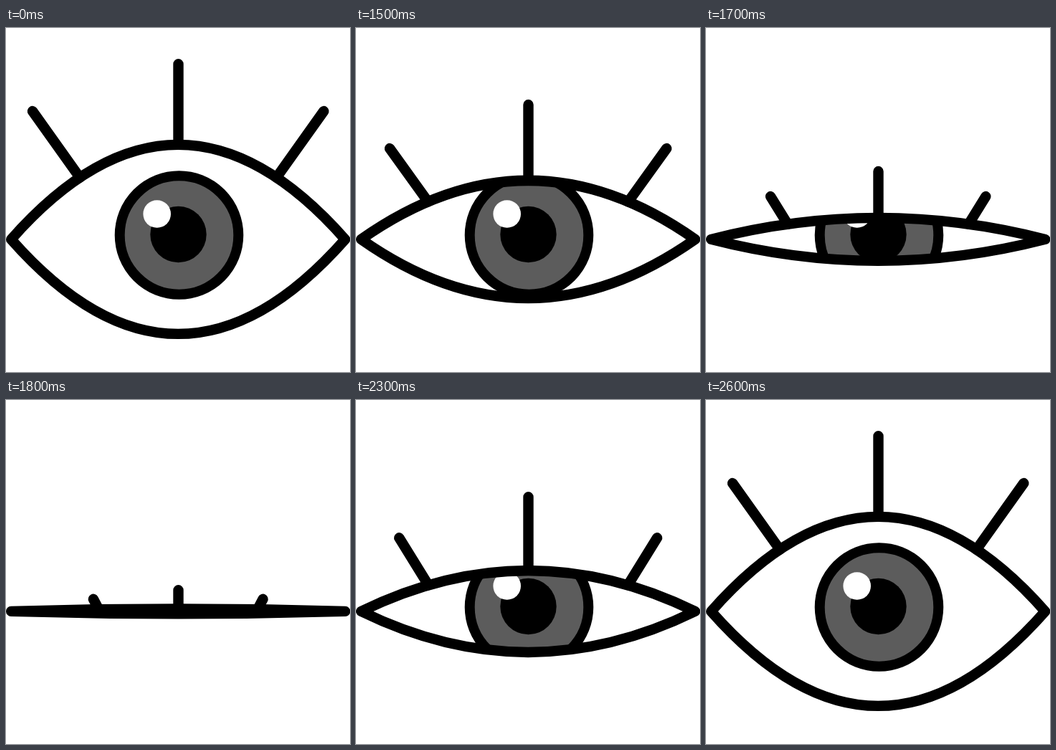
Recreate the animation shown at these times as an HTML page. Size 480 by 480 pixels, loop 2700 ms.

```html
<!DOCTYPE html>
<html lang="en">
<head>
<meta charset="utf-8">
<title>Blinking eye</title>
<style>
  html, body { margin: 0; width: 100%; height: 100%; overflow: hidden; background: #fff; }
  svg { display: block; width: 100vw; height: 100vh; }
  .line { fill: none; stroke: #000; stroke-width: 14.4; stroke-linecap: round; stroke-linejoin: round; }
</style>
</head>
<body>
<svg viewBox="0 0 480 480">
  <clipPath id="opening"><path id="hole"/></clipPath>
  <g clip-path="url(#opening)">
    <circle cx="241.5" cy="289" r="82.8" fill="#5c5c5c" stroke="#000" stroke-width="14"/>
    <circle cx="240.5" cy="288" r="39.2"/>
    <circle cx="210.7" cy="259.5" r="19.3" fill="#fff"/>
  </g>
  <path id="lashes" class="line"/>
  <path id="lid" class="line"/>
</svg>
<script>
  const LOOP = 2700, STEP = 100, CLOSE = 1400, OPEN = 2100;
  const MID = 240.2, AXIS = 294.9, HALF = 233;

  // Lid height, middle lash tip y, side lash tip x and y, side lash root x
  const poses = [
    [132, 50.3, 37, 116, 103],
    [106.5, 80.3, 38.5, 146.3, 101],
    [82, 107, 47, 168, 100.5],
    [57, 135.3, 60.2, 192.3, 101],
    [30, 200, 90, 235, 114],
    [3.4, 265.3, 121.9, 277.8, 129.5],
    [0, AXIS, 140, AXIS, 140]
  ];
  const [hole, lid, lashes] = ['hole', 'lid', 'lashes'].map(id => document.getElementById(id));
  let shown = -1;

  function poseAt(t) {
    if (t < CLOSE) return 0;
    if (t < OPEN) return Math.min(6, 1 + Math.floor((t - CLOSE) / STEP));
    return Math.max(0, 5 - Math.floor((t - OPEN) / STEP));
  }

  function draw(index) {
    const [height, midTip, tipX, tipY, rootX] = poses[index];
    const left = MID - HALF, right = MID + HALF;
    const rootY = AXIS - height * (1 - ((MID - rootX) / HALF) ** 2);
    const outline = `M${left} ${AXIS}Q${MID} ${AXIS - 2 * height} ${right} ${AXIS}` +
      `Q${MID} ${AXIS + 2 * height} ${left} ${AXIS}Z`;
    hole.setAttribute('d', outline);
    lid.setAttribute('d', outline);
    lashes.setAttribute('d',
      `M${MID + 0.3} ${midTip}V${AXIS - height}` +
      `M${tipX} ${tipY}L${rootX} ${rootY}` +
      `M${2 * MID - tipX} ${tipY}L${2 * MID - rootX} ${rootY}`);
  }

  const start = performance.now();
  function tick() {
    const index = poseAt((performance.now() - start) % LOOP);
    if (index !== shown) draw(shown = index);
    requestAnimationFrame(tick);
  }
  tick();
</script>
</body>
</html>
```
